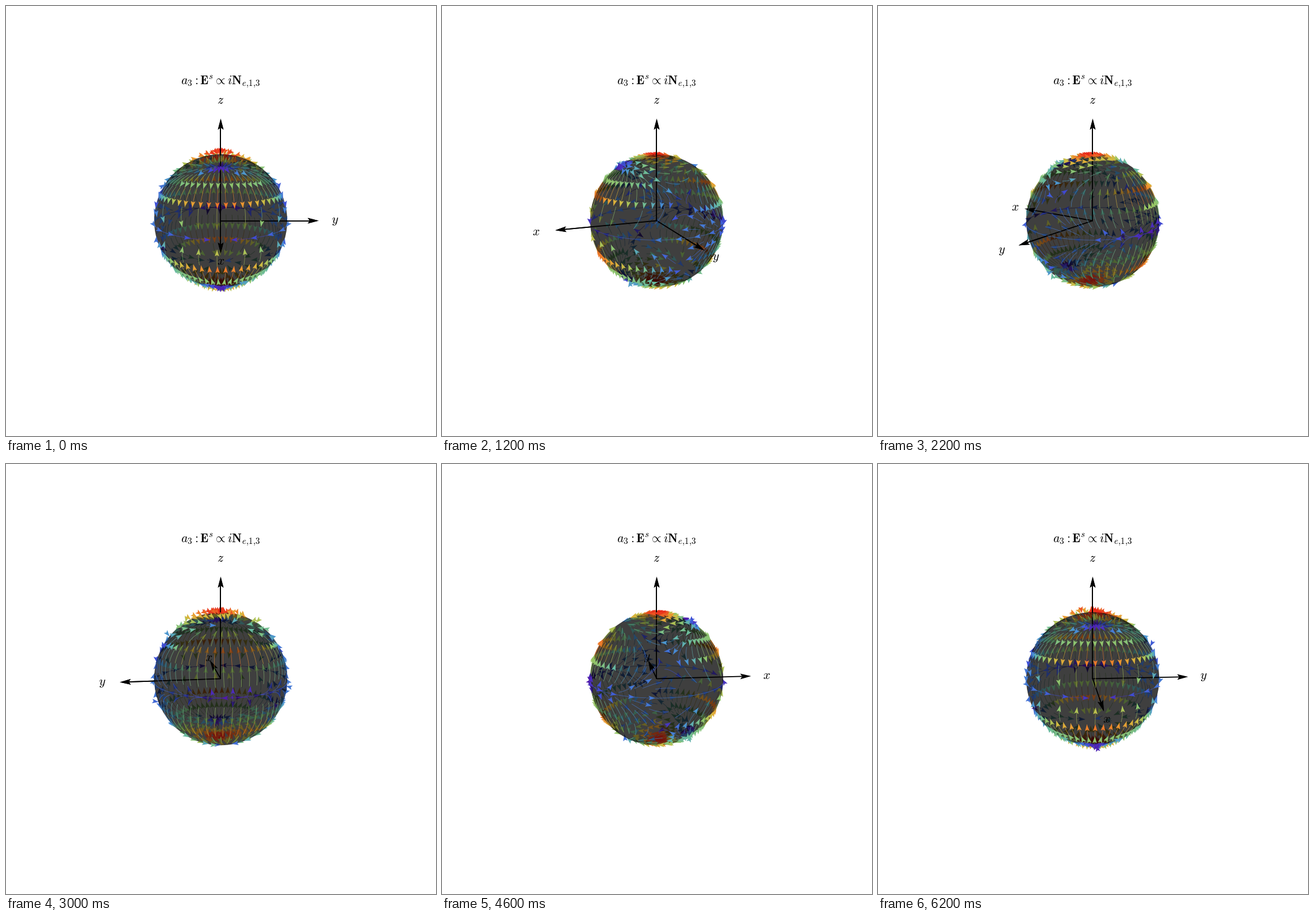
A matplotlib script that plays this animation: 748 px wide and 748 px high, repeating every 6300 ms.

```python
import numpy as np
import matplotlib.pyplot as plt
from matplotlib.animation import FuncAnimation
from matplotlib.collections import LineCollection, PolyCollection
from matplotlib.patches import Circle

SIZE, DPI = 748, 88
PT = 72 / DPI                    # points per pixel
FRAMES, STEP = 63, 0.1           # camera turns 0.1 rad per frame
MID = 373.5
DIST, ZOOM = 5.3, 602            # camera distance in sphere radii, focal length in px
ELEV = np.arctan(0.25)
AXIS, LABEL = 1.5, 1.75
DEG = np.pi / 180
ROW, COL = 15.0, 360 / 53        # arrow spacing along and across the flow
HEAD = np.array([[0, 0], [-11.5, 3.9], [-9.2, 0], [-11.5, -3.9]])
AXIS_HEAD = np.array([[0, 0], [-19, 4.9], [-15.5, 0], [-19, -4.9]])

STOPS = [0, .14, .3, .45, .6, .73, .87, 1]
RGB = np.array([(82, 24, 170), (62, 80, 215), (72, 145, 212), (105, 187, 160),
                (150, 198, 100), (212, 188, 65), (238, 148, 46), (232, 35, 25)]) / 255

plt.rcParams["mathtext.fontset"] = "cm"


# --- vector field on the unit sphere -----------------------------------
def field(p):
    """Tangent field of the (e,1,3) mode: theta part, phi part, sin(theta)."""
    c = p[..., 2]
    s = np.maximum(np.hypot(p[..., 0], p[..., 1]), 1e-3)
    cos_p, sin_p = p[..., 0] / s, p[..., 1] / s
    return -c * (15 * c**2 - 11) * cos_p, (5 * c**2 - 1) * sin_p, s


def speed(p):
    et, ep, _ = field(p)
    return np.hypot(et, ep) / 4


def sphere(theta, phi):
    return np.stack([np.sin(theta) * np.cos(phi), np.sin(theta) * np.sin(phi),
                     np.cos(theta)], -1)


def flow(p):
    """Velocity in space that moves at unit speed in the (phi, theta) plane."""
    et, ep, s = field(p)
    rate = np.maximum(np.hypot(et, ep / s), 1e-6)[..., None]
    cos_p, sin_p, c = p[..., 0] / s, p[..., 1] / s, p[..., 2]
    e_theta = np.stack([c * cos_p, c * sin_p, -s], -1)
    e_phi = np.stack([-sin_p, cos_p, 0 * s], -1)
    return (et[..., None] * e_theta + ep[..., None] * e_phi) / rate


def candidates():
    """Regular rows first, then a shuffled fine grid that fills the gaps."""
    rows = (np.arange(12) + 0.5) * ROW
    cols = -2.65 + COL * np.arange(53)
    th, ph = (a.ravel() for a in np.meshgrid(rows, cols, indexing="ij"))
    et, ep, s = field(sphere(th * DEG, ph * DEG))
    steep = np.abs(et) > 1.2 * np.abs(ep / s)
    grid = np.column_stack([th, ph])[steep]
    equator = np.column_stack([np.full(24, 90.0), 7.5 + 15 * np.arange(24)])
    fine = np.stack(np.meshgrid(np.arange(3.5, 178, 2.5), np.arange(0, 360, 2.5),
                                indexing="ij"), -1).reshape(-1, 2)
    np.random.default_rng(3).shuffle(fine)
    return np.vstack([equator, grid, fine])


def place_seeds():
    """Greedy placement with an oval gap stretched along the flow."""
    cand = candidates()
    et, ep, s = field(sphere(cand[:, 0] * DEG, cand[:, 1] * DEG))
    way = np.column_stack([et, ep / s])
    way /= np.maximum(np.linalg.norm(way, axis=1), 1e-6)[:, None]
    kept = np.empty((0, 2))
    for point, (wt, wp) in zip(cand, way):
        dt = kept[:, 0] - point[0]
        dp = (kept[:, 1] - point[1] + 180) % 360 - 180
        along, across = dt * wt + dp * wp, dt * wp - dp * wt
        if np.all((along / (0.93 * ROW))**2 + (across / (0.85 * COL))**2 > 1):
            kept = np.vstack([kept, point])
    return sphere(kept[:, 0] * DEG, kept[:, 1] * DEG)


def trace_back(tips, steps=14):
    path = [tips]
    h = ROW * DEG / steps
    for _ in range(steps):
        p = path[-1]
        half = p - flow(p) * h / 2
        half /= np.linalg.norm(half, axis=1)[:, None]
        p = p - flow(half) * h
        path.append(p / np.linalg.norm(p, axis=1)[:, None])
    return np.stack(path, 1)


PATHS = trace_back(place_seeds())
SHADE = speed(PATHS[:, 8])
COLORS = np.column_stack([np.interp(SHADE, STOPS, RGB[:, k]) for k in range(3)])


# --- camera --------------------------------------------------------------
def view(p, turn):
    """Screen position and depth toward the camera."""
    x, y, z = p[..., 0], p[..., 1], p[..., 2]
    right = y * np.cos(turn) - x * np.sin(turn)
    near = x * np.cos(turn) + y * np.sin(turn)
    depth = near * np.cos(ELEV) + z * np.sin(ELEV)
    up = z * np.cos(ELEV) - near * np.sin(ELEV)
    k = ZOOM / (DIST - depth)
    return np.stack([MID + k * right, MID - k * up], -1), depth


def heads(tip, back, shape):
    d = tip - back
    d = d / np.maximum(np.linalg.norm(d, axis=-1, keepdims=True), 1e-6)
    n = np.stack([-d[..., 1], d[..., 0]], -1)
    return (tip[..., None, :] + shape[:, :1] * d[..., None, :]
            + shape[:, 1:] * n[..., None, :])


# --- stage ---------------------------------------------------------------
fig = plt.figure(figsize=(SIZE / DPI, SIZE / DPI), dpi=DPI, facecolor="white")
ax = fig.add_axes([0, 0, 1, 1])
ax.set_xlim(0, SIZE)
ax.set_ylim(SIZE, 0)
ax.axis("off")

radius = ZOOM / np.sqrt(DIST**2 - 1)
for z in (2, 4):                 # far and near shell, each half opaque
    ax.add_patch(Circle((MID, MID), radius, fc="black", ec="none", alpha=0.5, zorder=z))


def add_lines(z, width, **style):
    return ax.add_collection(LineCollection([], linewidths=width * PT, zorder=z, **style),
                             autolim=False)


def add_polys(z, **style):
    return ax.add_collection(PolyCollection([], linewidths=0, zorder=z, **style),
                             autolim=False)


far_lines, near_lines = add_lines(1, 0.85, alpha=0.7), add_lines(5, 0.85, alpha=0.65)
layers = [add_polys(z) for z in (1.5, 3, 6)]     # behind, inside, in front
axis_lines = [add_lines(z, 1.8, colors="black") for z in (3.5, 7)]
axis_heads = [add_polys(z, facecolors="black") for z in (3.5, 7)]

FONT = 21.5 * PT
ax.text(MID, 136, r"$a_3:\mathbf{E}^s\propto i\mathbf{N}_{e{,}1{,}3}$",
        fontsize=FONT, ha="center", va="baseline", zorder=8)
labels = [ax.text(0, 0, f"${c}$", fontsize=FONT, ha="center", va="center")
          for c in "xyz"]


def draw_field(turn):
    xy, depth = view(PATHS, turn)
    gap = np.sum(PATHS**2, -1) - 2 * DIST * depth      # grows with camera distance
    near = depth[:, 0] > 1 / DIST
    coming = gap[:, 0] < gap[:, 3]
    # a flat head sits at its tip's depth, so it can dip into the shell
    level = near.astype(int) + coming
    for lines, pick in ((far_lines, ~near), (near_lines, near)):
        lines.set_segments(xy[pick])
        lines.set_color(COLORS[pick])
    shapes = heads(xy[:, 0], xy[:, 2], HEAD)
    order = np.argsort(depth[:, 0])
    for k, layer in enumerate(layers):
        pick = order[level[order] == k]
        layer.set_verts(shapes[pick])
        layer.set_facecolor(COLORS[pick])


def draw_axes(turn):
    unit = np.eye(3)
    start, _ = view(0 * unit, turn)
    rim, _ = view(unit, turn)
    tip, depth = view(AXIS * unit, turn)
    spot, _ = view(LABEL * unit, turn)
    shapes = heads(tip, start, AXIS_HEAD)
    notch = shapes[:, 2]
    front = depth > -1e-6
    axis_lines[0].set_segments(np.stack([start, notch], 1))
    axis_heads[0].set_verts(shapes)
    axis_lines[1].set_segments(np.stack([rim, notch], 1)[front])
    axis_heads[1].set_verts(shapes[front])
    for text, pos, ahead in zip(labels, spot, front):
        text.set_position(pos)
        text.set_zorder(8 if ahead else 3.6)


def draw(i):
    draw_field(i * STEP)
    draw_axes(i * STEP)
    return []


anim = FuncAnimation(fig, draw, frames=FRAMES, interval=100, repeat=True,
                     repeat_delay=0, blit=False)
plt.show()
```
